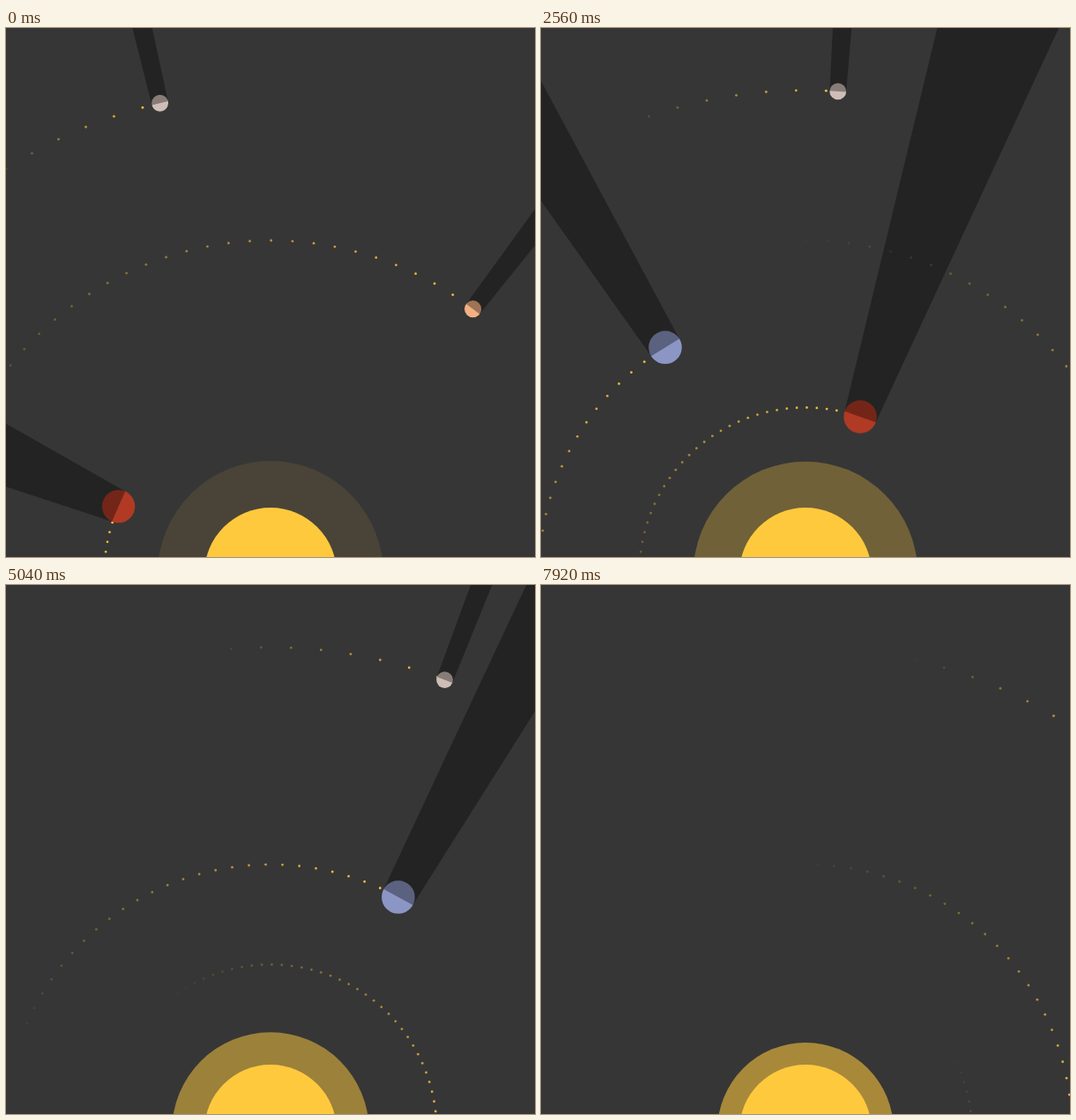
Recreate the animation shown at these times as an HTML page with a canvas. Size 600 by 600 pixels, loop 7960 ms.

```html
<!DOCTYPE html>
<html lang="en">
<head>
<meta charset="utf-8">
<title>Orbits</title>
<style>
  html, body { margin: 0; width: 100%; height: 100%; overflow: hidden; background: #363636; }
  canvas { display: block; width: 600px; height: 600px; }
</style>
</head>
<body>
<canvas id="stage" width="600" height="600"></canvas>
<script>
const ctx = document.getElementById('stage').getContext('2d');
const LOOP = 7960, STEP = 40;
const CX = 300, CY = 619, SUN_R = 75, SUN = '255, 201, 62';
const FADE = 4.15; // seconds a trail dot takes to vanish
const PULSE = { start: 1.23, period: 3.14, grow: 1.5, spread: 53 };

// Shared eased sweep: [seconds, degrees clockwise from straight up]
const SWEEP = [
  [-4, -174], [-2, -124], [0, -66.1], [0.88, -38.35], [1.8, -7.3],
  [3.24, 43.2], [4.36, 82.3], [5.84, 132.3], [8, 199]
];

const slope = i => (SWEEP[i + 1][1] - SWEEP[i][1]) / (SWEEP[i + 1][0] - SWEEP[i][0]);

function tangent(i) {
  const last = SWEEP.length - 1;
  if (i === 0) return slope(0);
  if (i === last) return slope(last - 1);
  const before = SWEEP[i][0] - SWEEP[i - 1][0];
  const after = SWEEP[i + 1][0] - SWEEP[i][0];
  return (slope(i - 1) * after + slope(i) * before) / (before + after);
}

function sweep(t) {
  const first = SWEEP[0];
  if (t < first[0]) return first[1] + slope(0) * (t - first[0]);
  let i = 0;
  while (i < SWEEP.length - 2 && t > SWEEP[i + 1][0]) i++;
  const [t0, a0] = SWEEP[i], [t1, a1] = SWEEP[i + 1];
  const h = t1 - t0, s = (t - t0) / h, s2 = s * s, s3 = s2 * s;
  return a0 * (2 * s3 - 3 * s2 + 1) + a1 * (3 * s2 - 2 * s3)
    + h * tangent(i) * (s3 - 2 * s2 + s) + h * tangent(i + 1) * (s3 - s2);
}

// dots: [first angle, spacing, count]
const planets = [
  { orbit: 188.5, r: 18.7, color: '#b03a24', dots: [-82.4, 3.452, 49], angle: sweep },
  { orbit: 302, r: 18.8, color: '#8c96c4', dots: [-80.68, 3.62, 46], angle: t => 0.7 * sweep(t) - 45.25 },
  { orbit: 378, r: 9.6, color: '#f3b083', dots: [-51.3, 3.672, 29], angle: t => 37.4 + 24 * t - 0.8 * t * t },
  { orbit: 548.3, r: 9.4, color: '#cfbeb8', dots: [-33.12, 3.556, 19], angle: t => 0.2 * sweep(t) }
];

function polar(deg, dist) {
  const a = deg * Math.PI / 180;
  return [CX + dist * Math.sin(a), CY - dist * Math.cos(a)];
}

function passTime(angle, target) {
  let lo = -7, hi = 8;
  for (let i = 0; i < 30; i++) {
    const mid = (lo + hi) / 2;
    if (angle(mid) < target) lo = mid; else hi = mid;
  }
  return lo;
}

const trail = planets.flatMap(p => {
  const [first, gap, count] = p.dots;
  return Array.from({ length: count }, (_, i) => {
    const deg = first + i * gap;
    return { at: polar(deg, p.orbit), born: passTime(p.angle, deg) };
  });
});

function disc(x, y, r, fill) {
  ctx.fillStyle = fill;
  ctx.beginPath();
  ctx.arc(x, y, r, 0, Math.PI * 2);
  ctx.fill();
}

function drawSun(t) {
  const { start, period, grow, spread } = PULSE;
  const age = (t - start + 2 * period) % period;
  const s = Math.min(1, age / grow);
  const alpha = Math.max(0, Math.min(0.57, 0.73 - 0.333 * age));
  disc(CX, CY, SUN_R + spread * (1 - (1 - s) ** 2), `rgba(${SUN}, ${alpha})`);
  disc(CX, CY, SUN_R, `rgb(${SUN})`);
}

function drawDots(t) {
  for (const { at, born } of trail) {
    const age = t - born;
    if (age >= 0 && age < FADE) disc(at[0], at[1], 1.4, `rgba(${SUN}, ${1 - age / FADE})`);
  }
}

// The shadow starts at the planet's middle, so it also shades the far half.
function drawPlanet(p, t) {
  const deg = p.angle(t);
  const [x, y] = polar(deg, p.orbit);
  disc(x, y, p.r, p.color);
  const far = 1500, spread = p.r * far / p.orbit;
  ctx.save();
  ctx.translate(CX, CY);
  ctx.rotate(deg * Math.PI / 180);
  ctx.fillStyle = 'rgba(0, 0, 0, 0.35)';
  ctx.beginPath();
  ctx.moveTo(-p.r, -p.orbit);
  ctx.lineTo(-spread, -far);
  ctx.lineTo(spread, -far);
  ctx.lineTo(p.r, -p.orbit);
  ctx.fill();
  ctx.restore();
}

function draw(ms) {
  const t = Math.floor((ms % LOOP) / STEP) * STEP / 1000;
  ctx.fillStyle = '#363636';
  ctx.fillRect(0, 0, 600, 600);
  drawDots(t);
  drawSun(t);
  planets.forEach(p => drawPlanet(p, t));
}

const began = performance.now();
function tick() {
  draw(performance.now() - began);
  requestAnimationFrame(tick);
}
tick();
</script>
</body>
</html>
```
